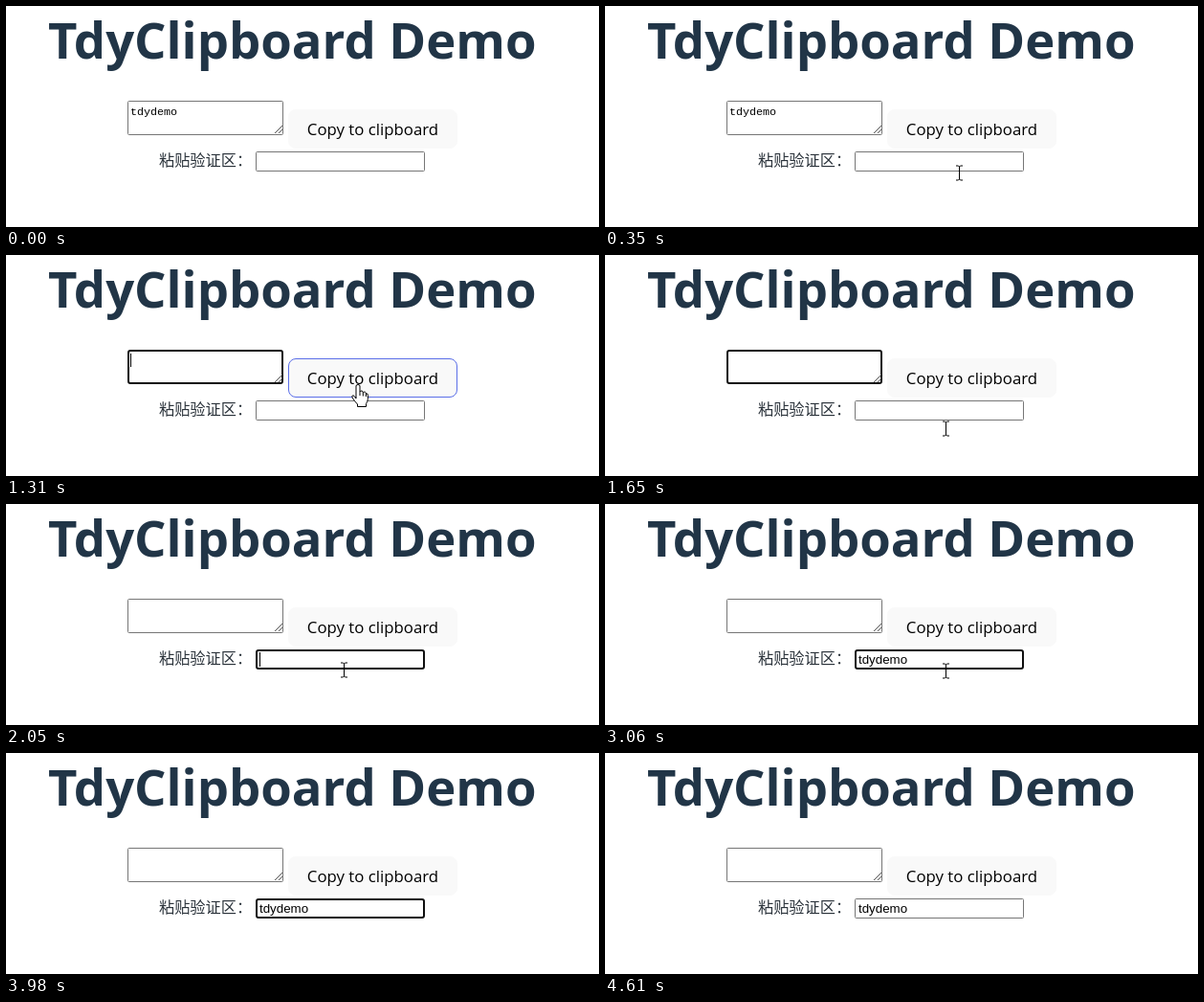
An HTML page with a canvas that plays this animation: 620 by 231 pixels, repeating every 4680 ms.

```html
<!DOCTYPE html>
<html lang="zh-CN">
<head>
<meta charset="utf-8">
<title>TdyClipboard Demo</title>
<style>
html, body { margin: 0; width: 100%; height: 100%; overflow: hidden; background: #fff; }
canvas { display: block; width: 620px; height: 231px; }
</style>
</head>
<body>
<canvas id="stage" width="620" height="231"></canvas>
<script>
const ctx = document.getElementById('stage').getContext('2d');
const LOOP = 4680;
const CUT = 1040, FOCUS_INPUT = 1850, PASTE = 3060, BLUR = 4610;
const GREY = '#767676', INK = '#213547';

// Pointer moves: start time, end time, number of steps, then start, control and end points.
const moves = [
  [140, 690, 8, [374, 222], [367, 148], [366, 127]],
  [1310, 1720, 6, [368, 135], [356, 198], [354, 176]],
  [1850, 1850, 1, [353, 173], [353, 173], [353, 173]],
  [2660, 2660, 1, [356, 174], [356, 174], [356, 174]],
  [3060, 3550, 7, [356, 174], [376, 201], [381, 229]]
];

const HAND = new Path2D('M-2 15V2Q-2 .5 0 .5Q2 .5 2 2V8Q2.5 6.8 4 7Q5.3 7.2 5.3 9Q6 7.8 7.4 8.2Q8.4 8.6 8.4 10Q10.4 9.3 10.4 11.5V15.5Q10 18.5 8.5 20.5V23.5H-.5V21Q-3.5 18 -6 14Q-6.8 12 -5 11.8Q-4 11.8 -2 15Z');
const KNUCKLES = new Path2D('M2 8V12M5.3 9V12.5M8.4 10V13');
const ARROW = new Path2D('M.5 .5V16.3L4.2 12.9L6.7 18.3L9 17.3L6.6 11.9H11.7Z');
const BEAM = new Path2D('M-3.5 -7.5H-1L0 -6.5L1 -7.5H3.5M0 -6.5V6.5M-3.5 7.5H-1L0 6.5L1 7.5H3.5');

const within = (t, ...spans) => spans.some(([a, b]) => t >= a && t < b);

function text(value, x, y, font, color = '#000', align = 'left') {
  ctx.font = font;
  ctx.fillStyle = color;
  ctx.textAlign = align;
  ctx.fillText(value, x, y);
}

function box(x, y, w, h, line, color, radius, fill = '#fff') {
  ctx.beginPath();
  ctx.roundRect(x + line / 2, y + line / 2, w - line, h - line, radius);
  ctx.fillStyle = fill;
  ctx.fill();
  ctx.lineWidth = line;
  ctx.strokeStyle = color;
  ctx.stroke();
}

function field(x, y, w, h, focused) {
  if (focused) box(x, y, w, h, 2, '#101010', 2);
  else box(x, y, w, h, 1, GREY, 1);
}

function caret(x, y, h) {
  ctx.fillStyle = '#000';
  ctx.fillRect(x, y, 1, h);
}

function pointerAt(t) {
  if (t < 140 || t >= 3630) return null;
  const [start, end, steps, a, c, b] = moves.filter(m => t >= m[0]).pop();
  const p = t >= end ? 1 : Math.floor((t - start) / (end - start) * steps + 1e-6) / steps;
  const q = 1 - p;
  return a.map((v, i) => q * q * v + 2 * q * p * c[i] + p * p * b[i]);
}

const overButton = p => p && p[0] > 295 && p[0] < 472 && p[1] >= 108 && p[1] < 149;
const overInput = p => p[0] > 261 && p[0] < 438 && p[1] >= 152 && p[1] < 185;

function drawPointer(p) {
  ctx.save();
  ctx.translate(Math.round(p[0]), Math.round(p[1]));
  ctx.strokeStyle = '#000';
  ctx.fillStyle = '#fff';
  ctx.lineWidth = 1;
  if (overInput(p)) {
    ctx.translate(.5, .5);
    ctx.stroke(BEAM);
  } else {
    const hand = overButton(p);
    const shape = hand ? HAND : ARROW;
    ctx.fill(shape);
    ctx.stroke(shape);
    if (hand) ctx.stroke(KNUCKLES);
  }
  ctx.restore();
}

function draw(t) {
  const pointer = pointerAt(t);
  ctx.fillStyle = '#fff';
  ctx.fillRect(0, 0, 620, 231);
  text('TdyClipboard Demo', 299.3, 55, 'bold 52.6px "Open Sans", sans-serif', INK, 'center');

  field(127, 99, 163, 36, within(t, [CUT, FOCUS_INPUT]));
  ctx.beginPath();
  ctx.moveTo(281, 133);
  ctx.lineTo(289, 125);
  ctx.moveTo(285, 133);
  ctx.lineTo(289, 129);
  ctx.lineWidth = 1;
  ctx.strokeStyle = '#555';
  ctx.stroke();
  if (t < CUT) text('tdydemo', 130, 114, '11.7px "Liberation Mono", monospace');
  if (within(t, [CUT, 1540])) caret(130, 103, 14);

  box(295, 108, 177, 41, 1, overButton(pointer) ? '#5b6fe8' : '#f9f9f9', 7.5, '#f9f9f9');
  text('Copy to clipboard', 383.4, 135, '16.8px "Open Sans", sans-serif', '#000', 'center');

  text('粘贴验证区\uff1a', 160, 167, '16.2px "Noto Sans CJK SC", "Noto Sans CJK", sans-serif', '#2b333b');
  field(261, 152, 177, 21, within(t, [FOCUS_INPUT, BLUR]));
  if (t >= PASTE) text('tdydemo', 265, 167, '13.333px "Liberation Sans", Arial, sans-serif');
  if (within(t, [FOCUS_INPUT, 2310], [2860, PASTE])) caret(265, 155, 15);
  if (within(t, [3410, 3980], [4470, BLUR])) caret(316, 155, 15);

  if (pointer) drawPointer(pointer);
}

const began = performance.now();
function tick() {
  draw((performance.now() - began) % LOOP);
  requestAnimationFrame(tick);
}
tick();
</script>
</body>
</html>
```
